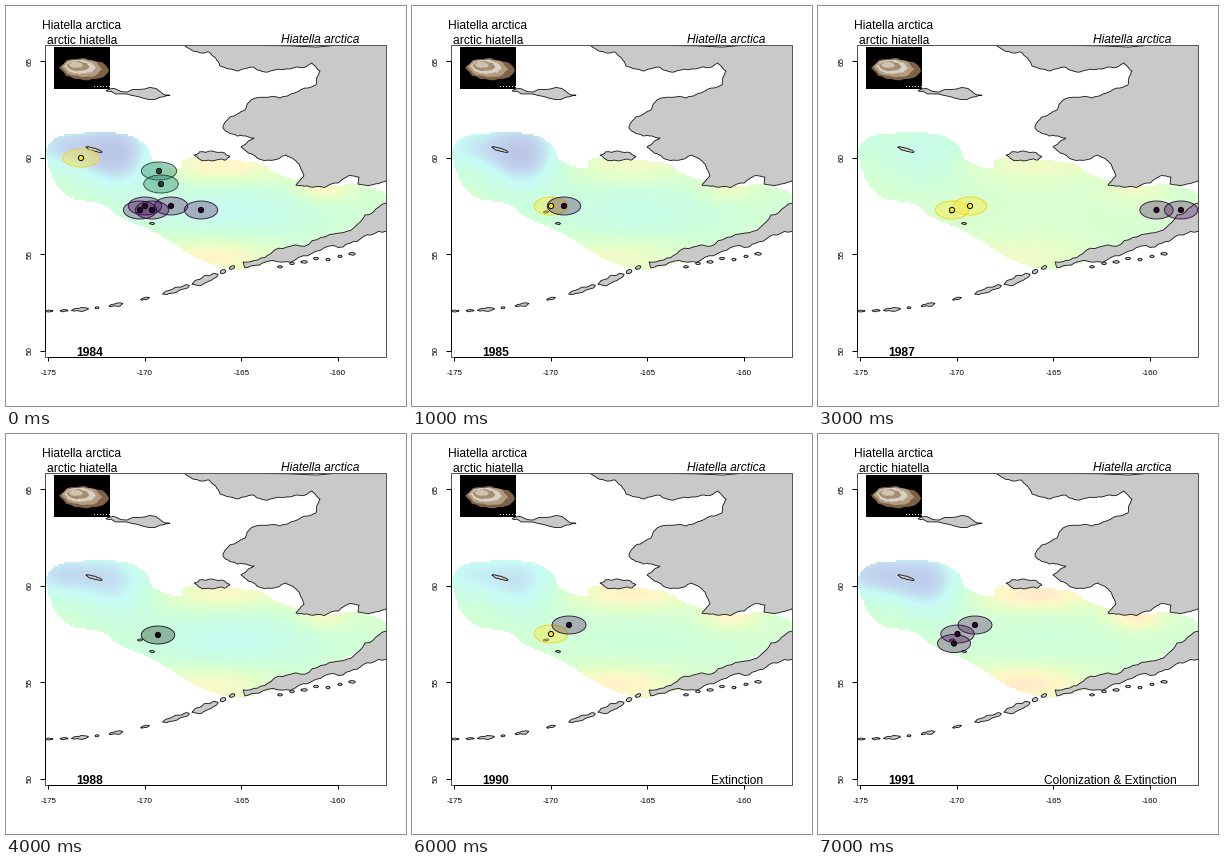
Animation, 400 px wide and 400 px high, one loop 8 s. Source, as a matplotlib script:

```python
import numpy as np
import matplotlib.pyplot as plt
from matplotlib.animation import FuncAnimation
from matplotlib.colors import LinearSegmentedColormap
from matplotlib.patches import Ellipse, Polygon, Rectangle
from matplotlib.path import Path

PT = 0.72            # points per pixel at 100 dpi
THIN = 0.85 * PT
DEG = 19.3           # pixels per degree
LEFT, TOP, RIGHT, BOTTOM = 39, 39, 380, 351

plt.rcParams["font.family"] = "Liberation Sans"
fig = plt.figure(figsize=(4, 4), dpi=100, facecolor="white")
ax = fig.add_axes([0, 0, 1, 1])
ax.axis("off")
frame_box = Rectangle((LEFT, TOP), RIGHT - LEFT, BOTTOM - TOP, fill=False,
                      ec="#555555", lw=PT, zorder=6)
ax.add_patch(frame_box)
rng = np.random.default_rng(4)


def rough(points, amount, levels=3):
    """Roughen a closed outline by displacing the middle of each segment."""
    pts = np.array(points, float)
    for _ in range(levels):
        step = np.roll(pts, -1, axis=0) - pts
        normal = np.c_[-step[:, 1], step[:, 0]]
        shift = rng.uniform(-amount, amount, (len(pts), 1))
        middle = pts + step / 2 + normal * shift
        pts = np.stack([pts, middle], axis=1).reshape(-1, 2)
    return pts


def smooth(points, n=8):
    """Closed Catmull-Rom curve through the points."""
    p1 = np.array(points, float)
    p0, p2, p3 = (np.roll(p1, k, axis=0) for k in (1, -1, -2))
    t = np.linspace(0, 1, n, endpoint=False)[:, None, None]
    curve = 0.5 * (2 * p1 + (p2 - p0) * t + (2 * p0 - 5 * p1 + 4 * p2 - p3) * t**2
                   + (3 * p1 - p0 - 3 * p2 + p3) * t**3)
    return curve.transpose(1, 0, 2).reshape(-1, 2)


def land(outline):
    patch = Polygon(outline, fc="#c9c9c9", ec="#161616", lw=THIN,
                    joinstyle="round", zorder=3)
    ax.add_patch(patch)
    patch.set_clip_path(frame_box)


def oval(x, y, length, width, slope=0.0, amount=0.15):
    """Rough ellipse lying along the given slope."""
    a = np.linspace(0, 2 * np.pi, 9)[:-1]
    u, v = length / 2 * np.cos(a), width / 2 * np.sin(a)
    turn = np.arctan(slope)
    c, s = np.cos(turn), np.sin(turn)
    return rough(np.c_[x + c * u - s * v, y + s * u + c * v], amount, 2)


def text(x, y, s, size=12, **kw):
    kw = {"ha": "center", "va": "baseline", "zorder": 9, **kw}
    return ax.text(x, y, s, fontsize=size * PT, **kw)


def line(xs, ys):
    ax.plot(xs, ys, color="black", lw=PT, zorder=7, solid_capstyle="butt")


# Mainland
COAST = [
    (178, 30), (179, 40), (187, 45), (203, 46), (214, 60), (232, 65),
    (247, 61), (262, 66), (283, 63), (306, 57), (314, 65), (310, 79),
    (293, 85), (274, 92), (245, 94), (239, 104), (224, 111), (217, 122),
    (231, 130), (248, 132), (235, 141), (251, 152), (268, 154), (280, 149),
    (293, 158), (298, 170), (290, 179), (304, 181), (332, 177), (342, 170),
    (353, 171), (352, 178), (366, 179), (390, 168), (390, 30)]
land(rough(COAST, 0.1))

# Peninsula widening to the east
spine = np.array([(238, 259), (266, 251), (300, 245), (335, 234), (362, 219), (392, 208)])
half = 3 + 11 * np.linspace(0, 1, len(spine)) ** 2
upper, lower = spine - np.c_[half * 0.3, half], spine + np.c_[half * 0.3, half]
land(rough(np.r_[upper, lower[::-1]], 0.13))

# Islands: St. Lawrence, Nunivak, St. Matthew and the Pribilofs
for x, y, length, width, slope in [
        (132, 87, 64, 7, 0.07), (206, 150, 36, 10, 0.05), (88, 143.5, 17, 3, 0.3),
        (134, 206, 5, 2, -0.1), (146, 217.5, 5, 2, 0.1)]:
    land(oval(x, y, length, width, slope))

# Aleutian chain along a parabola
for x, length, width in [(43, 8, 2), (58, 8, 2), (74, 17, 3), (91, 4, 2),
                         (110, 14, 3), (139, 9, 2), (170, 28, 5), (199, 28, 7),
                         (217, 6, 4), (226, 6, 3)]:
    t = (x - 40) / 185
    land(oval(x, 305 - 43 * t ** 2, length, width, -0.46 * t))
for x in range(274, 350, 12):
    land(oval(x, 260 - 0.17 * (x - 274) + rng.uniform(-2, 2), rng.uniform(3, 7), 2.5))

# Axes
line([42, 332], [BOTTOM, BOTTOM])
line([LEFT, LEFT], [55, 345])
for i in range(4):
    x, y = 42 + 96.5 * i, 55 + 96.5 * i
    line([x, x], [BOTTOM, BOTTOM + 4])
    line([LEFT, LEFT - 5], [y, y])
    text(x + 0.5, 369, str(5 * i - 175), 8)
    text(24.5, y + 0.5, str(65 - 5 * i), 8, rotation=90, va="center")

# Titles
text(76, 23, "Hiatella arctica")
text(76, 37.5, "arctic hiatella")
text(314.5, 37, "Hiatella arctica", style="italic")
year_text = text(84, 350, "", weight="bold")
note_text = text(325, 350, "")

# Shell picture as nested flat shapes
ax.add_patch(Rectangle((48, 41), 56, 42, fc="black", zorder=8))
for k, color in enumerate(["#7d6248", "#b39c80", "#d8d2c6", "#a58d70", "#cfc4b2"]):
    ring = oval(78 - 2 * k, 63 - k, 50 - 9 * k, 22 - 4 * k, 0.06, 0.1)
    ax.add_patch(Polygon(ring, fc=color, ec="none", zorder=8.5))
for x in range(88, 104, 3):
    ax.add_patch(Rectangle((x, 80), 1, 1, fc="#dddddd", zorder=8.5))

# Temperature field inside the survey area
AREA = Path(smooth([
    (40, 150), (50, 132), (78, 127), (118, 128), (140, 139), (148, 154),
    (174, 163), (180, 153), (222, 154), (256, 158), (276, 170), (320, 179),
    (354, 179), (380, 188), (380, 202), (300, 243), (237, 263), (195, 254),
    (150, 227), (112, 210), (96, 198), (58, 188)]))
CMAP = LinearSegmentedColormap.from_list("pastel", [
    (0.0, "#bcc6e6"), (0.15, "#c2d8f0"), (0.3, "#c8fbf6"), (0.5, "#ccffdc"),
    (0.7, "#e4ffc9"), (0.85, "#fff8c8"), (1.0, "#ffe3cc")])
gx, gy = np.meshgrid(np.arange(40, 380, 2) + 1, np.arange(126, 266, 2) + 1)
outside = ~AREA.contains_points(np.c_[gx.ravel(), gy.ravel()]).reshape(gx.shape)


def blob(x, y, w, h):
    return np.exp(-((gx - x) / w) ** 2 / 2 - ((gy - y) / h) ** 2 / 2)


PATTERNS = np.array([
    blob(55, 140, 30, 18),                                # western edge
    blob(112, 148, 26, 24),                               # northern cold pool
    blob(225, 206, 70, 22),                               # mid-shelf tongue
    blob(220, 160, 45, 12) + blob(318, 182, 20, 10)
    + blob(205, 250, 45, 14)])                            # warm shallows
ANOMALY = [  # one row a year, one strength for each pattern
    (-0.4, -0.55, -0.25, 0.3), (-0.3, -0.55, -0.2, 0.2),
    (-0.1, -0.6, -0.25, 0.2), (-0.1, -0.2, 0.02, 0.17),
    (-0.4, -0.35, -0.25, 0.25), (-0.05, -0.15, -0.25, 0.27),
    (-0.3, -0.35, -0.1, 0.3), (-0.45, -0.45, -0.08, 0.35)]


def field(i):
    warmth = 0.6 + np.tensordot(ANOMALY[i], PATTERNS, axes=1)
    return np.ma.masked_where(outside, warmth)


sea = ax.imshow(field(0), cmap=CMAP, vmin=0, vmax=1, interpolation="nearest",
                extent=(40, 380, 266, 126), aspect="auto", zorder=1)
ax.set_xlim(0, 400)
ax.set_ylim(400, 0)

# Catches of each year by kind
STYLE = {  # ring fill, ring edge, ring alpha, dot fill
    "gold": ("#fde725", "#f3d224", 0.38, "#fde725"),
    "plum": ("#440154", "#2c0a38", 0.30, "#2a0436"),
    "teal": ("#21806c", "#20403c", 0.38, "#12483e"),
    "dark": ("#20382c", "#101010", 0.36, "#000000")}
CATCHES = [
    {"gold": [(75, 152)], "teal": [(153, 165), (155, 178)],
     "plum": [(139, 200), (134, 204), (146, 204), (165, 200), (195, 204)]},
    {"gold": [(139, 200)], "plum": [(152, 200)]},
    {"gold": [(139, 200), (146, 203)], "plum": [(181, 190.5)]},
    {"gold": [(134, 204), (152, 200)], "plum": [(338.5, 204), (363, 204)]},
    {"dark": [(152, 201)]},
    {"gold": [(73, 146)], "plum": [(110, 133.5)]},
    {"gold": [(139, 200)], "plum": [(157, 191)]},
    {"plum": [(157, 191), (139.5, 200), (136, 209.5)]}]
NOTES = [""] * 5 + ["Extinction", "Extinction", "Colonization & Extinction"]
marks = []


def mark(x, y, kind):
    fill, edge, alpha, dot = STYLE[kind]
    lat = np.radians(60 - (y - 152) / DEG)
    size = (18 / np.cos(lat), 18)
    for patch in (
            Ellipse((x, y), *size, fc=fill, ec="none", alpha=alpha, zorder=4),
            Ellipse((x, y), *size, fill=False, ec=edge, lw=THIN, zorder=4),
            Ellipse((x, y), 5.2, 5.2, fc=dot, ec="black", lw=PT, zorder=5)):
        ax.add_patch(patch)
        patch.set_clip_path(frame_box)
        marks.append(patch)


def draw(i):
    while marks:
        marks.pop().remove()
    sea.set_data(field(i))
    for kind, places in CATCHES[i].items():
        for x, y in places:
            mark(x, y, kind)
    year_text.set_text(str(1984 + i))
    note_text.set_text(NOTES[i])
    note_text.set_x(292.5 if "&" in NOTES[i] else 325)
    return []


anim = FuncAnimation(fig, draw, frames=8, interval=1000, repeat=True,
                     repeat_delay=0, init_func=lambda: draw(0), blit=False)
plt.show()
```
